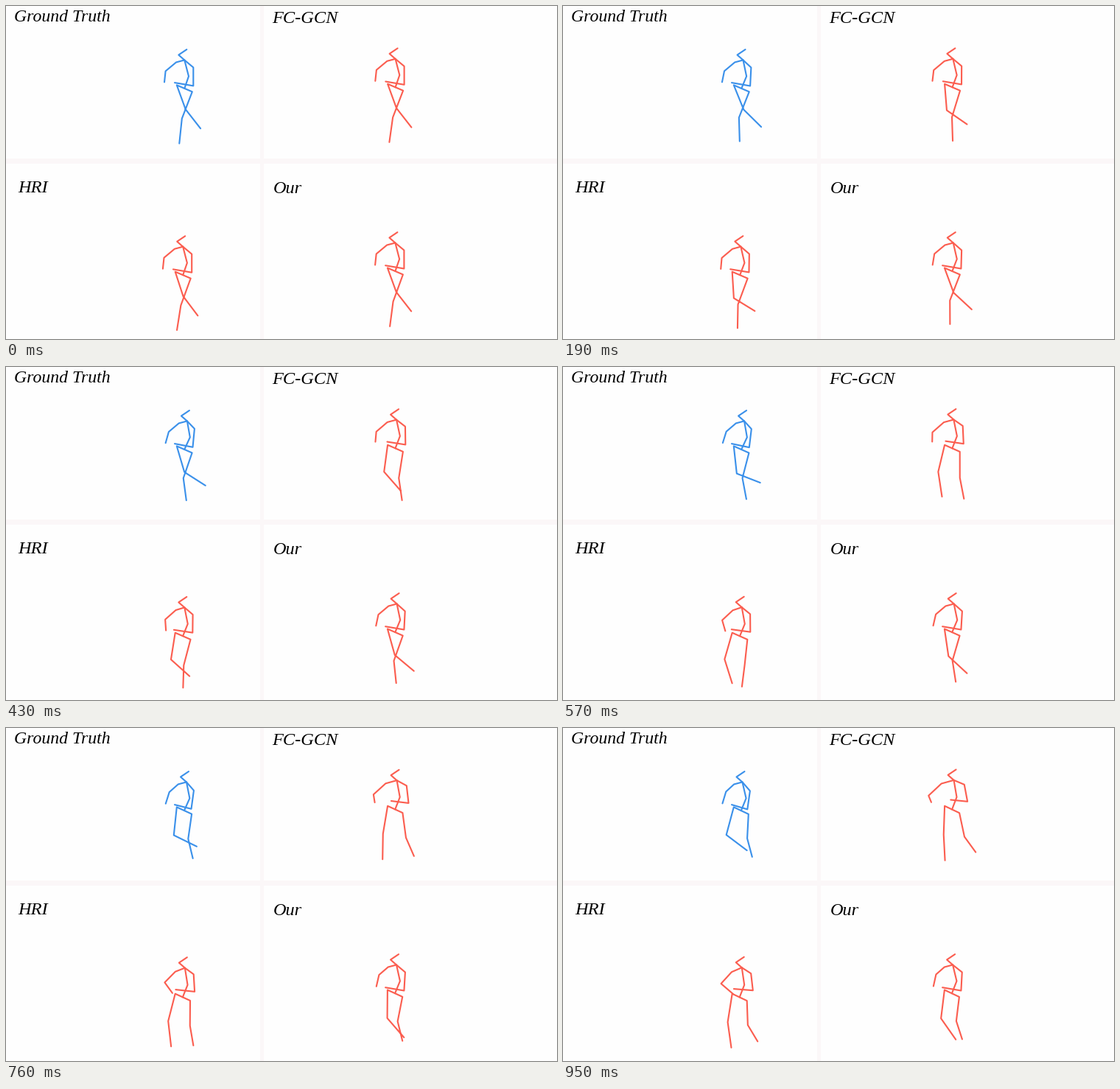
Write a matplotlib script that moves like this. It is 748x452 px and loops after 1 s.

```python
import numpy as np
import matplotlib.pyplot as plt
from matplotlib.animation import FuncAnimation
from matplotlib.patches import Rectangle

W, H, DPI = 748, 452, 64
PX = 72 / DPI                      # points per pixel
FRAMES, INTERVAL = 100, 10
TICKS, POSES = 21, 19

BLUE, RED = "#3a90ea", "#fb5d4f"
PAPER, GUTTER = "#fefefe", "#fbf7f8"

# Resting joints, relative to the neck
REST = dict(
    head=(3, -14.4), face=(-8, -7), neck=(0, 0),
    l_shoulder=(-11.3, 3), l_elbow=(-25.7, 15), l_hand=(-27.3, 30),
    r_shoulder=(12, 10), r_elbow=(12, 35), r_hand=(-13.3, 30.7),
    spine=(5.7, 22), l_hip=(-10.5, 34), r_hip=(10.5, 43))
CHAINS = [
    ("head", "face", "neck", "l_shoulder", "l_elbow", "l_hand"),
    ("neck", "r_shoulder", "r_elbow", "r_hand"),
    ("neck", "spine", "pelvis"),
    ("l_foot", "l_knee", "l_hip", "pelvis", "r_hip", "r_knee", "r_foot"),
]
# How far each joint follows the sideways sway; the others stay put
SWAY = dict(head=1, face=1, neck=1, l_shoulder=1, l_elbow=1,
            l_hand=0.4, r_shoulder=0.5, spine=0.5)

progress = np.linspace(0, 1, POSES)[:, None]
sway = np.sin(0.9 * np.pi * progress)
swing = progress ** 2


def smooth(values):
    """Cubic Hermite curve through evenly spaced values, one sample per pose."""
    values = np.array(values, float)
    slopes = np.gradient(values)
    t = progress[:, 0] * (len(values) - 1)
    i = np.minimum(t.astype(int), len(values) - 2)
    u = t - i
    return ((1 + 2 * u) * (1 - u) ** 2 * values[i] + u * (1 - u) ** 2 * slopes[i]
            + u * u * (3 - 2 * u) * values[i + 1] + u * u * (u - 1) * slopes[i + 1])


def limb(start, angles, first, last):
    """End of a bone hanging from start; its length is foreshortened linearly."""
    turn = np.radians(smooth(angles))
    length = first + (last - first) * progress
    return start + length * np.column_stack([np.sin(turn), np.cos(turn)])


def make_walker(neck, sway_size, reach, l_thigh, l_shin, r_thigh, r_shin):
    """Joint paths from torso offsets at the loop's end and leg angles in degrees."""
    reach = dict(reach, r_hip=(-1, 0.5))
    reach["face"] = reach["neck"] = reach.get("head", (0, 0))
    j = {name: np.add(neck, rest) + swing * reach.get(name, (0, 0))
         + sway * (sway_size * SWAY.get(name, 0), 0) for name, rest in REST.items()}
    j["pelvis"] = (j["l_hip"] + j["r_hip"]) / 2
    j["l_knee"] = limb(j["l_hip"], l_thigh, 35, 39)
    j["l_foot"] = limb(j["l_knee"], l_shin, 33, 35)
    j["r_knee"] = limb(j["r_hip"], r_thigh, 39, 33)
    j["r_foot"] = limb(j["r_knee"], r_shin, 34, 26)
    return j


truth = make_walker(
    (242.3, 73.4), 3.8,
    dict(l_elbow=(3.5, -2), l_hand=(1, -1), r_shoulder=(-1, 2), r_elbow=(-4, 2)),
    l_thigh=(20, 21, 3, -15), l_shin=(38, 50, 70, 53),
    r_thigh=(-21, -21, -13, -3), r_shin=(-6, 5, 11.5, 15))

fc_gcn = make_walker(
    (528.6, 71.8), 1.2,
    dict(head=(1.6, -1), l_shoulder=(-4, 0.7), l_elbow=(-7, 5), l_hand=(-1.5, -1),
         r_shoulder=(4, -5), r_elbow=(8.5, -7), r_hand=(11, -5)),
    l_thigh=(20, -2, -14, -2), l_shin=(38, 56, 2, 3),
    r_thigh=(-21, -14, 2.5, 12), r_shin=(-8, 6, 13, 36))

hri = make_walker(
    (240.2, 326.7), 1.8,
    dict(head=(2, -1.5), l_shoulder=(-0.5, 1.5), l_elbow=(-0.5, 5.3), l_hand=(18, 4.5),
         r_shoulder=(2.7, -3.5), r_elbow=(5.6, -5.5), r_hand=(5, -3.3)),
    l_thigh=(18, -3, -17, -9), l_shin=(37, 61, 11, 8),
    r_thigh=(-20, -19, -4, 2), r_shin=(-9, 1, -6, 31))

ours = make_walker(
    (528.4, 321.5), 2.3,
    dict(l_elbow=(3, -2), l_hand=(1.5, -1), r_shoulder=(1, 0)),
    l_thigh=(20, 19, 6, -7), l_shin=(38, 50, 46, 35),
    r_thigh=(-20, -21, -15, -7), r_shin=(-7.5, 3.6, 10, 18))

fig = plt.figure(figsize=(W / DPI, H / DPI), dpi=DPI, facecolor=PAPER)
ax = fig.add_axes([0, 0, 1, 1])
ax.set(xlim=(0, W), ylim=(H, 0))
ax.axis("off")

ax.add_patch(Rectangle((345, 0), 5, H, color=GUTTER, lw=0))
ax.add_patch(Rectangle((0, 207), W, 7, color=GUTTER, lw=0))

for label, x, baseline, size in [("Ground Truth", 11, 21, 23.8), ("FC-GCN", 361, 22.7, 24.4),
                                 ("HRI", 16, 252.7, 24.4), ("Our", 363, 254.3, 24.2)]:
    ax.text(x, baseline, label, family="Liberation Serif", style="italic",
            size=size * PX, color="black", va="baseline")

walkers = []
for joints, color in [(truth, BLUE), (fc_gcn, RED), (hri, RED), (ours, RED)]:
    lines = [ax.plot([], [], color=color, lw=2.1 * PX, solid_joinstyle="round",
                     solid_capstyle="round")[0] for _ in CHAINS]
    walkers.append((joints, lines))


def pose_at(frame):
    """The 19 poses are resampled to 21 ticks per loop, so two poses hold."""
    tick = max(k for k in range(TICKS) if round(k * FRAMES / TICKS) <= frame)
    return int(tick * POSES / TICKS + 0.69)


def update(frame):
    pose = pose_at(frame)
    for joints, lines in walkers:
        for chain, line in zip(CHAINS, lines):
            line.set_data(*zip(*(joints[name][pose] for name in chain)))
    return [line for _, lines in walkers for line in lines]


anim = FuncAnimation(fig, update, frames=FRAMES, interval=INTERVAL,
                     repeat=True, repeat_delay=0, blit=True)
plt.show()
```
